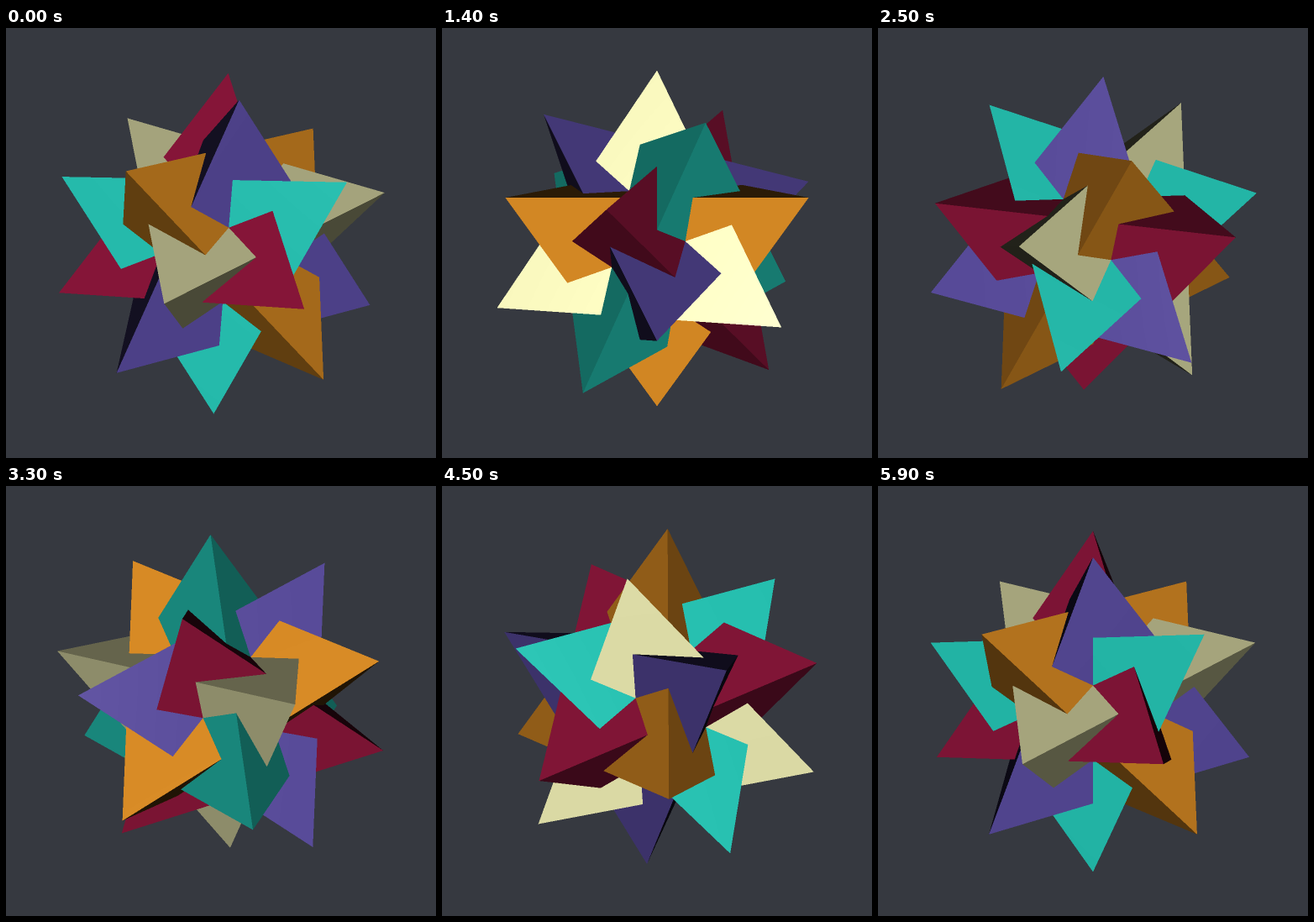
An HTML page with a canvas for the animation above (6000 ms loop, 512 px wide and 512 px high).

```html
<!DOCTYPE html>
<html lang="en">
<head>
<meta charset="utf-8">
<title>Compound of five tetrahedra</title>
<style>
  html, body { margin: 0; width: 100%; height: 100%; overflow: hidden; background: #363940; }
  canvas { display: block; width: 512px; height: 512px; }
</style>
</head>
<body>
<canvas id="stage" width="1024" height="1024"></canvas>
<script>
const SIZE = 1024;              // drawn at twice the stage size for smooth edges
const MID = SIZE / 2;
const DIST = 6.35;              // eye distance, with circumradius 1
const FOCAL = 2 * 203 * DIST;
const TILT = 25 * Math.PI / 180;
const STEP = 100, STEPS = 60;
const SHINE = 30, GLOSS = 68;
const BACK = [54, 57, 64];

// Vertices of a dodecahedron, shared out among five tetrahedra
const P = (1 + Math.sqrt(5)) / 2, Q = 1 / P;
const SOLIDS = [
  { color: [168, 27, 71],   points: [[0, P, Q], [Q, 0, -P], [-P, -Q, 0], [1, -1, 1]] },
  { color: [90, 76, 160],   points: [[0, P, -Q], [-1, -1, -1], [P, -Q, 0], [-Q, 0, P]] },
  { color: [38, 203, 186],  points: [[-P, Q, 0], [1, 1, -1], [0, -P, -Q], [Q, 0, P]] },
  { color: [241, 154, 40],  points: [[1, 1, 1], [-1, 1, -1], [1, -1, -1], [-1, -1, 1]] },
  { color: [252, 251, 190], points: [[-1, 1, 1], [P, Q, 0], [-Q, 0, -P], [0, -P, Q]] }
];

const ctx = document.getElementById('stage').getContext('2d');
const image = ctx.createImageData(SIZE, SIZE);
const pixels = new Uint32Array(image.data.buffer);
const depth = new Float32Array(SIZE * SIZE);
const owner = new Uint8Array(SIZE * SIZE);

const clamp = v => v > 255 ? 255 : v;
const pack = (r, g, b) =>
  (255 << 24 | clamp(b) << 16 | clamp(g) << 8 | clamp(r)) >>> 0;

// Spin about the (0, 1, 1) axis, then lean that axis away from the eye
function turn([x, y, z], angle) {
  const s = Math.sin(angle), c = Math.cos(angle);
  const up = (y + z) / Math.SQRT2, out = (y - z) / Math.SQRT2;
  const front = out * c - x * s;
  return [
    x * c + out * s,
    up * Math.cos(TILT) + front * Math.sin(TILT),
    front * Math.cos(TILT) - up * Math.sin(TILT)
  ].map(v => v / Math.sqrt(3));
}

function project([x, y, z]) {
  const k = FOCAL / (DIST - z);
  return [MID + x * k, MID - y * k];
}

function visibleFaces(angle) {
  const faces = [];
  for (const { color, points } of SOLIDS) {
    const turned = points.map(p => turn(p, angle));
    turned.forEach((apex, i) => {
      const normal = apex.map(v => -v);
      const facing = normal[2] * DIST - 1 / 3;
      if (facing <= 0) return;
      const corners = turned.filter((_, j) => j !== i).map(project);
      faces.push({ color, normal, facing, corners });
    });
  }
  return faces;
}

// Scan one triangle into the depth buffer; inverse depth is linear on screen
function scan(face, id) {
  const { corners, normal: [nx, ny, nz], facing } = face;
  const ys = corners.map(c => c[1]);
  const top = Math.ceil(Math.min(...ys) - 0.5);
  const bottom = Math.floor(Math.max(...ys) - 0.5);
  const slope = -nx / (FOCAL * facing);
  for (let row = top; row <= bottom; row++) {
    const y = row + 0.5;
    let left = Infinity, right = -Infinity;
    for (let i = 0; i < 3; i++) {
      const [ax, ay] = corners[i], [bx, by] = corners[(i + 1) % 3];
      if ((ay <= y) === (by <= y)) continue;
      const x = ax + (bx - ax) * (y - ay) / (by - ay);
      left = Math.min(left, x);
      right = Math.max(right, x);
    }
    const start = Math.ceil(left - 0.5), end = Math.ceil(right - 0.5);
    const base = (nz - ny * (MID - y) / FOCAL) / facing;
    for (let x = start; x < end; x++) {
      const near = base + slope * (x + 0.5 - MID);
      const at = row * SIZE + x;
      if (near > depth[at]) {
        depth[at] = near;
        owner[at] = id;
      }
    }
  }
}

// Light shines along the view axis: flat diffuse plus a soft highlight
function shade(faces) {
  const back = pack(...BACK);
  const flat = faces.map(f => f.color.map(v => Math.round(v * f.normal[2])));
  const solid = flat.map(c => pack(...c));
  for (let row = 0, at = 0; row < SIZE; row++) {
    const v = (MID - row - 0.5) / FOCAL;
    for (let col = 0; col < SIZE; col++, at++) {
      const id = owner[at] - 1;
      if (id < 0) { pixels[at] = back; continue; }
      const [nx, ny, nz] = faces[id].normal;
      if (nz < 0.75) { pixels[at] = solid[id]; continue; }
      const u = (col + 0.5 - MID) / FOCAL;
      const len = Math.sqrt(u * u + v * v + 1);
      const hx = -u / len, hy = -v / len, hz = 1 / len + 1;
      const half = (nx * hx + ny * hy + nz * hz) / Math.sqrt(hx * hx + hy * hy + hz * hz);
      const glow = Math.round(GLOSS * nz * Math.pow(half, SHINE));
      const c = flat[id];
      pixels[at] = pack(c[0] + glow, c[1] + glow, c[2] + glow);
    }
  }
}

function draw(step) {
  depth.fill(0);
  owner.fill(0);
  const faces = visibleFaces((step + 1) / STEPS * 2 * Math.PI);
  faces.forEach((face, i) => scan(face, i + 1));
  shade(faces);
  ctx.putImageData(image, 0, 0);
}

let shown = -1;
const begin = performance.now();

function tick() {
  const step = Math.floor((performance.now() - begin) / STEP + 0.01) % STEPS;
  if (step !== shown) draw(shown = step);
  requestAnimationFrame(tick);
}
tick();
</script>
</body>
</html>
```
